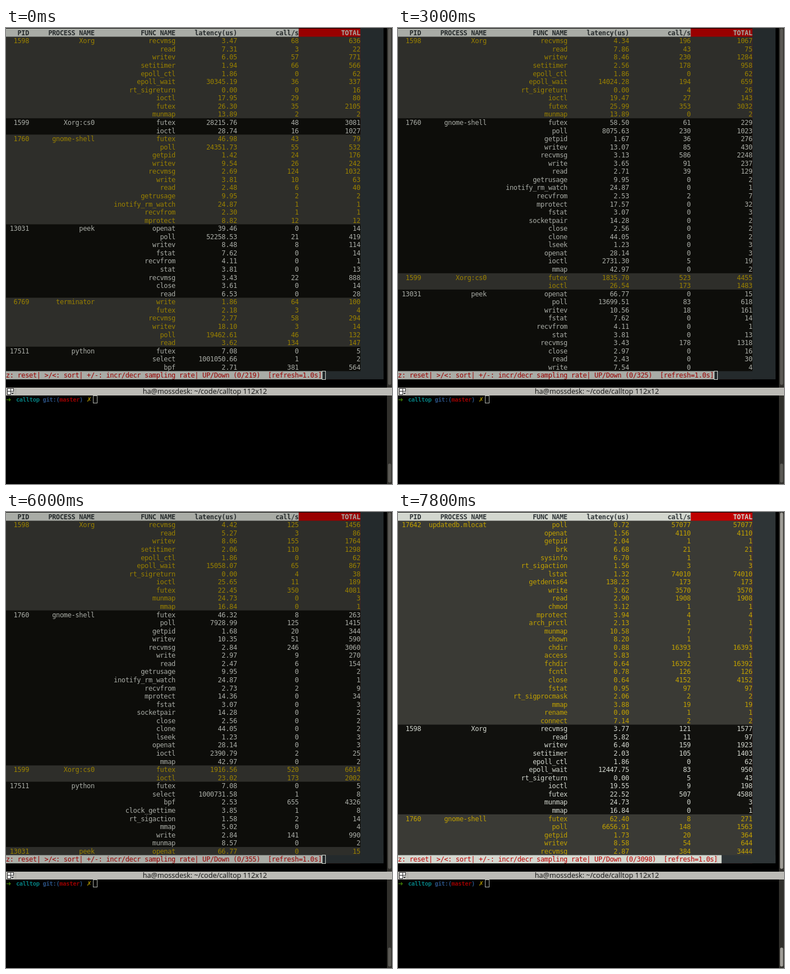
An HTML page with a canvas for the animation above (8000 ms loop, 688 px wide and 814 px high).

```html
<!DOCTYPE html>
<html lang="en">
<head>
<meta charset="utf-8">
<title>calltop</title>
<style>
html, body { margin: 0; width: 100%; height: 100%; overflow: hidden; background: #000; }
canvas { display: block; }
</style>
</head>
<body>
<canvas id="stage" width="688" height="814"></canvas>
<script>
const ctx = document.getElementById('stage').getContext('2d');
const LOOP = 8000, CELL = 6.866, ROW = 14.56, TOP = 1, ROWS = 41;
const MONO = '"DejaVu Sans Mono", monospace';
const ENDS = [6, 23, 44, 60, 76, 92];   // right edge of each table column
const HEADS = ['PID', 'PROCESS NAME', 'FUNC NAME', 'latency(us)', 'call/s', 'TOTAL'];

// Start time, number of lines, processes in order
const STEPS = [
  [0, 219, '1598 1599 1760 13031 6769 17511'],
  [1000, 281, '1598 1760 1599 13031'],
  [2000, 294, '1598 1760 1599 13031'],
  [3000, 325, '1598 1760 1599 13031'],
  [4000, 340, '1598 1760 1599 13031'],
  [5000, 341, '1598 1760 1599 17511 13031'],
  [6000, 355, '1598 1760 1599 17511 13031'],
  [6800, 3098, '17642 1598 1760'],
];

const THEMES = {
  dim: { light: '#a9aca6', ink: '#252a2b', red: '#990000', yellow: '#998000',
         back: '#242a2c', odd: '#2e2e2a', even: '#0d0d0a', thumb: '#5b5a55' },
  lit: { light: '#d3d7cf', ink: '#2e3436', red: '#bf0000', yellow: '#c0a000',
         back: '#2e3436', odd: '#3a3a35', even: '#11110e', thumb: '#a09e98' },
};

// Each line: function+earlier total, then latency/calls for every step.
// "-" is an idle step, "." a step before the first call.
function parse(text) {
  return text.trim().split('\n').map(line => {
    const [head, ...cells] = line.trim().split(/ +/);
    const [name, base = 0] = head.split('+');
    let total = +base, latency = '';
    return STEPS.map((_, i) => {
      const cell = cells[i] || '-';
      if (cell === '.') return null;
      const [lat, calls = 0] = cell.split('/');
      if (lat && lat !== '-') latency = lat;
      total += +calls;
      return [name, latency, calls, total];
    });
  });
}

const procs = {};
function proc(pid, name, ...blocks) {
  procs[pid] = { name, rows: blocks.flatMap(parse) };
}

proc(1598, 'Xorg', `
  recvmsg+568 3.47/68 4.79/107 4.34/128 /196 4.41/136 4.56/128 4.42/125 3.77/121
  read+19 7.31/3 9.59/6 7.86/4 /43 9.19/4 6.76/4 5.27/3 5.82/11
  writev+714 6.05/57 9.10/123 8.46/160 /230 8.75/165 8.74/160 8.06/155 6.40/159
  setitimer+500 1.94/66 2.49/98 2.56/116 /178 2.18/118 2.34/112 2.06/110 2.03/105
  epoll_ctl+62 1.86/0
  epoll_wait+301 30345.19/36 21659.11/58 14024.28/70 /194 14575.55/74 14187.33/69 15058.07/65 12447.75/83`, `
  rt_sigreturn+16 0.00/0 /2 /4 /4 /4 /4 /4 /5
  ioctl+51 17.95/29 27.85/24 19.47/12 /27 21.34/14 18.35/21 25.65/11 19.55/9
  futex+2070 26.30/35 23.67/223 25.99/351 /353 22.11/349 23.05/350 22.45/350 22.52/507
  munmap 13.89/2 - - - - 24.73/1
  mmap . . . . . 16.84/1`);

proc(1599, 'Xorg:cs0', `
  futex+3033 28215.76/48 3177.29/331 1835.70/520 /523 1919.89/519 1916.21/520 1916.56/520
  ioctl+1011 28.74/16 25.50/110 26.54/173 /173 22.53/173 24.19/173 23.02/173`);

proc(1760, 'gnome-shell', `
  futex+36 46.98/43 17.41/79 58.50/10 /61 42.03/16 62.27/10 46.32/8 62.40/8
  poll+477 24351.73/55 8994.50/138 8075.63/123 /230 7882.68/138 7671.97/129 7928.99/125 6656.91/148
  getpid+152 1.42/24 1.85/40 1.67/24 /36 1.76/24 1.73/24 1.68/20 1.73/20
  writev+216 9.54/26 10.28/49 13.07/54 /85 10.78/55 11.67/54 10.35/51 8.58/54
  recvmsg+908 2.69/124 2.29/375 3.13/255 /586 2.92/297 2.99/269 2.84/246 2.87/384
  write+53 3.81/10 2.03/71 3.65/12 /91 3.37/12 3.27/12 2.97/9
  read+34 2.48/6 2.39/42 2.71/8 /39 2.48/11 2.32/8 2.47/6`, `
  getrusage 9.95/2
  inotify_rm_watch 24.87/1
  recvfrom 2.30/1 1.40/4 - 2.53/2 - - 2.73/2
  mprotect 8.82/12 17.57/20 - - 14.36/2
  fstat . 3.07/3
  socketpair . 14.28/2
  close . 2.56/2
  clone . 44.05/2
  lseek . 1.23/3
  openat . 28.14/3
  ioctl . 356.56/12 2731.30/2 /5 2171.32/2 2218.43/2 2390.79/2
  mmap . 42.97/2`);

proc(13031, 'peek', `
  openat+14 39.46/0 66.77/1
  poll+398 52258.53/21 22350.72/46 13699.51/70 /83 14202.10/70
  writev+106 8.48/8 10.24/11 10.56/18 /18 9.09/18
  fstat+14 7.62/0
  recvfrom+1 4.11/0
  stat+13 3.81/0
  recvmsg+866 3.43/22 3.12/92 3.43/160 /178 2.75/160
  close+14 3.61/0 2.97/2
  read+28 6.53/0 2.43/2
  write . 7.54/4`);

proc(6769, 'terminator', `
  write+36 1.86/64
  futex+1 2.18/3
  recvmsg+236 2.77/58
  writev+11 18.10/3
  poll+86 19462.61/46
  read+13 3.62/134`);

proc(17511, 'python', `
  futex+5 7.08/0
  select+1 1001050.66/1 /1 /1 /1 /1 1001054.56/1 1000731.58/1
  bpf+183 2.71/381 /2430 - - - 2.68/677 2.53/655
  clock_gettime+6 . . . . . 3.61/1 3.85/1
  rt_sigaction+10 . . . . . 1.68/2 1.58/2
  mmap+4 . . . . . 5.02/0
  write+708 . . . . . 2.07/141 2.84/141
  munmap+2 . . . . . 8.57/0`);

const SCAN = `poll 0.72/57077, openat 1.56/4110, getpid 2.04/1, brk 6.68/21, sysinfo 6.70/1,
  rt_sigaction 1.56/3, lstat 1.32/74010, getdents64 138.23/173, write 3.62/3570, read 2.90/1908,
  chmod 3.12/1, mprotect 3.94/4, arch_prctl 2.13/1, munmap 10.58/7, chown 8.20/1,
  chdir 0.88/16393, access 5.83/1, fchdir 0.64/16392, fcntl 0.78/126, close 0.64/4152,
  fstat 0.95/97, rt_sigprocmask 2.06/2, mmap 3.88/19, rename 0.00/1, connect 7.14/2`;
proc(17642, 'updatedb.mlocat', SCAN.split(/,\s+/).join('\n').replace(/ /g, ' . . . . . . . '));

function box(x, y, right, bottom, color) {
  ctx.fillStyle = color;
  ctx.fillRect(x, y, right - x, bottom - y);
}

function pill(x, y, w, h, color) {
  ctx.fillStyle = color;
  ctx.beginPath();
  ctx.roundRect(x, y, w, h, w / 2);
  ctx.fill();
}

// Terminal text: one character per cell
function type(text, col, baseline, color, cell = CELL) {
  ctx.fillStyle = color;
  [...text].forEach((ch, i) => {
    if (ch !== ' ') ctx.fillText(ch, (col + i) * cell, baseline);
  });
}

const rowTop = i => TOP + i * ROW;
// Bands reach down to the table's end; later rows paint over them, so no seams show
const band = (i, from, to, color) => box(from * CELL, rowTop(i), to * CELL, rowTop(43), color);
const put = (text, i, end, color) =>
  type(String(text), end - String(text).length - 0.02, rowTop(i) + 11.8, color);

function outline(x, y, w, h, color) {
  ctx.strokeStyle = color;
  ctx.lineWidth = 1;
  ctx.strokeRect(x + 0.5, y + 0.5, w - 1, h - 1);
}

function drawTable(step, c) {
  const [, lines, order] = STEPS[step];
  box(0, 0, 98 * CELL, rowTop(43), c.back);
  box(0, 0, 92 * CELL, TOP, '#000');

  band(0, 0, 76, c.light);
  band(0, 76, 92, c.red);
  ctx.font = `bold 11.8px ${MONO}`;
  HEADS.forEach((head, i) => put(head, 0, ENDS[i], i === 5 ? c.light : c.ink));

  ctx.font = `12px ${MONO}`;
  let line = 1;
  order.split(' ').forEach((pid, n) => {
    const odd = n % 2 === 0, { name, rows } = procs[pid];
    const shown = rows.map(row => row[step]).filter(Boolean).slice(0, ROWS + 1 - line);
    if (shown.length) band(line, 0, 92, odd ? c.odd : c.even);
    shown.forEach((row, i) => {
      const cells = i ? ['', '', ...row] : [pid, name, ...row];
      cells.forEach((cell, k) => put(cell, line, ENDS[k], odd ? c.yellow : c.light));
      line++;
    });
  });

  const status = 'z: reset| >/<: sort| +/-: incr/decr sampling rate| ' +
    `UP/Down (0/${lines})  [refresh=1.0s]`;
  band(42, 0, 98, c.back);
  band(42, 0, status.length, c.light);
  put(status, 42, status.length, c.red);
  return status.length;
}

function drawCursor(col, t, c) {
  if (t < 6600) outline(Math.round(col * CELL), 612, 7, 16, '#d3d7cf');
  else if (t < 7200 || t >= 7800) band(42, col, col + 1, c.light);
}

function drawTitle() {
  box(0, 642, 688, 656, '#bcbbb6');
  box(17, 643, 18, 655, '#aaa9a4');
  box(2, 643, 13, 654, '#fff');
  outline(2, 643, 7, 6, '#222');
  outline(8, 643, 6, 6, '#222');
  outline(2, 648, 7, 7, '#222');
  ctx.fillStyle = '#222';
  ctx.beginPath();
  ctx.moveTo(9, 651);
  ctx.lineTo(14, 651);
  ctx.lineTo(11.5, 654);
  ctx.fill();
  ctx.font = '12.6px "Open Sans", sans-serif';
  ctx.textAlign = 'center';
  ctx.fillStyle = '#111';
  ctx.fillText('ha@mossdesk: ~/code/calltop 112x12', 354.5, 653);
  ctx.textAlign = 'left';
}

function drawPrompt() {
  const cell = 5.96;
  ctx.font = `bold 10.4px ${MONO}`;
  [['calltop', 3, '#057f80'], ['git:(', 11, '#2a5183'],
   ['master', 16, '#990000'], [')', 22, '#2a5183']]
    .forEach(([text, col, color]) => type(text, col, 666.8, color, cell));
  ctx.font = 'bold 11px "DejaVu Sans", sans-serif';
  type('➜', 0, 667, '#3e7b05', cell);
  type('✗', 24.1, 667, '#a89000', cell);
  outline(155, 656, 8, 14, '#b4b7b0');
}

function draw(now) {
  const t = now % LOOP;
  const c = t < 6600 ? THEMES.dim : THEMES.lit;
  const step = STEPS.findLastIndex(s => s[0] <= t);
  box(0, 0, 688, 814, '#000');
  drawCursor(drawTable(step, c), t, c);
  box(679, 0, 688, 814, '#31302c');
  pill(681, 1, 5.5, 636, c.thumb);
  pill(681, 777.5, 5.5, 34, c.thumb);
  drawTitle();
  drawPrompt();
}

const start = performance.now();
function tick() {
  draw(performance.now() - start);
  requestAnimationFrame(tick);
}
tick();
</script>
</body>
</html>
```
